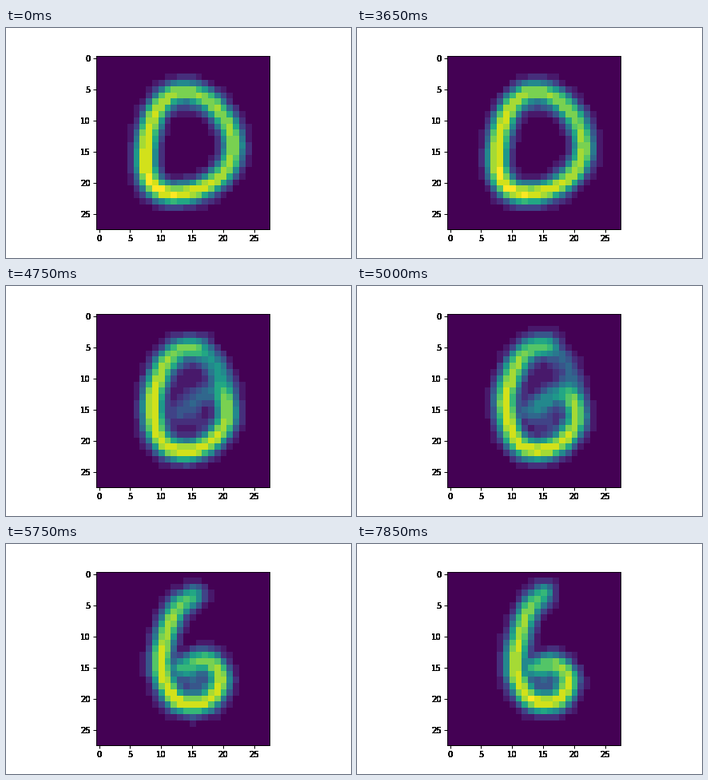
These frames come from a looping animation (432 by 288 pixels, 10000 ms). A matplotlib script:

```python
import numpy as np
import matplotlib.pyplot as plt
from matplotlib.animation import FuncAnimation

plt.rcParams.update({"font.family": "DejaVu Sans", "font.size": 10})

SIZE, STEP, FRAMES = 28, 50, 200
START, END, MIDDLE, TAU = 2250, 7850, 5050, 450
LEVELS = 15
ROWS, COLS = np.mgrid[:SIZE, :SIZE]

# Key points of the pen path: a wide 6 and the slim one it settles into.
WIDE = np.array([(15.5, 3.9), (12.3, 5.5), (10.1, 10), (9.5, 15), (12, 20.4),
                 (17, 20.7), (20, 16.8), (17.6, 13.2), (13, 15.2)])
SLIM = np.array([(15, 3), (12.6, 5.8), (10.9, 11), (10.6, 16), (13, 20.1),
                 (17.2, 20.3), (19, 17), (16.8, 14.5), (13, 15)])


def smooth(p, n=12):
    """Catmull-Rom curve through the given points."""
    p = np.vstack([2 * p[0] - p[1], p, 2 * p[-1] - p[-2]])
    a, b, c, d = p[:-3, None], p[1:-2, None], p[2:-1, None], p[3:, None]
    t = np.linspace(0, 1, n)[:, None]
    q = 2 * b + (c - a) * t + (2 * a - 5 * b + 4 * c - d) * t**2
    return (q + (3 * b - a - 3 * c + d) * t**3).reshape(-1, 2).T / 2


def stroke(x, y, peak):
    """Soft pen stroke along a path with varying brightness."""
    x, y, peak = (v[:, None, None] for v in (x, y, peak))
    dist = np.hypot(COLS - x, ROWS - y)
    return (peak * np.exp(-(dist / 1.8) ** 2.2)).max(axis=0)


def glow(img, x, y, rx, ry, v):
    """Add a faint blob to an image."""
    blob = v * np.exp(-((COLS - x) / rx) ** 2 - ((ROWS - y) / ry) ** 2)
    return 1 - (1 - img) * (1 - blob)


def zero(s):
    """Leaning oval that narrows and straightens as s grows."""
    a = np.linspace(0, 2 * np.pi, 120)
    cos, sin = np.cos(a), np.sin(a)
    x = 14.5 + (7 - 3 * s) * cos - (1.5 - 3 * s) * sin**2 - 0.65 * sin
    y = 14.7 - 1.1 * sin**2 + 8.2 * sin
    img = stroke(x, y, 0.92 - 0.08 * np.cos(a + np.pi / 4))
    img = glow(img, 14, 8.2, 2.8, 0.9, 0.15)
    return glow(img, 13, 11.5, 3.5, 4.5, 0.3 * s)


def six(s):
    """Curl that tightens as s grows."""
    u = min((1 - s) / 0.34, 1.8)
    x, y = smooth(SLIM + (WIDE - SLIM) * u)
    t = np.linspace(0, 1, len(x))
    img = stroke(x, y, 0.58 + 0.39 * np.sqrt(np.abs(np.sin(np.pi * t))))
    return glow(img, 15.4, 17.2, 2.2, 1.8, 0.25)


def sigmoid(t):
    return 1 / (1 + np.exp((MIDDLE - t) / TAU))


def image(i):
    lo, hi = sigmoid(START), sigmoid(END)
    s = (sigmoid(np.clip(i * STEP, START, END)) - lo) / (hi - lo)
    m = min(s / 0.8, 1)
    mix = m * m * (3 - 2 * m)
    img = zero(s) * (1 - mix) + six(s) * mix
    return np.round(img * LEVELS) / LEVELS


fig = plt.figure(figsize=(6, 4), dpi=72, facecolor="white")
fig.subplots_adjust(left=.125, right=.9, bottom=.125, top=.88)
ax = fig.add_subplot()
pic = ax.imshow(image(0), cmap="viridis", vmin=0, vmax=1,
                interpolation="nearest")

ticks = range(0, SIZE, 5)
ax.set_xticks(ticks)
ax.set_yticks(ticks)
ax.tick_params(length=4, width=1, labelbottom=False, labelleft=False)
ax.spines["bottom"].set_linewidth(1)

# Stacked copies give the labels hard, dark edges.
xt, xva, xha = ax.get_xaxis_text1_transform(7)
yt, yva, yha = ax.get_yaxis_text1_transform(7)
for _ in range(14):
    for v in ticks:
        ax.text(v, 0, str(v), transform=xt, va=xva, ha=xha)
        ax.text(0, v, str(v), transform=yt, va=yva, ha=yha)


def update(i):
    pic.set_data(image(i))
    return [pic]


anim = FuncAnimation(fig, update, frames=FRAMES, interval=STEP,
                     repeat=True, repeat_delay=0)
plt.show()
```
